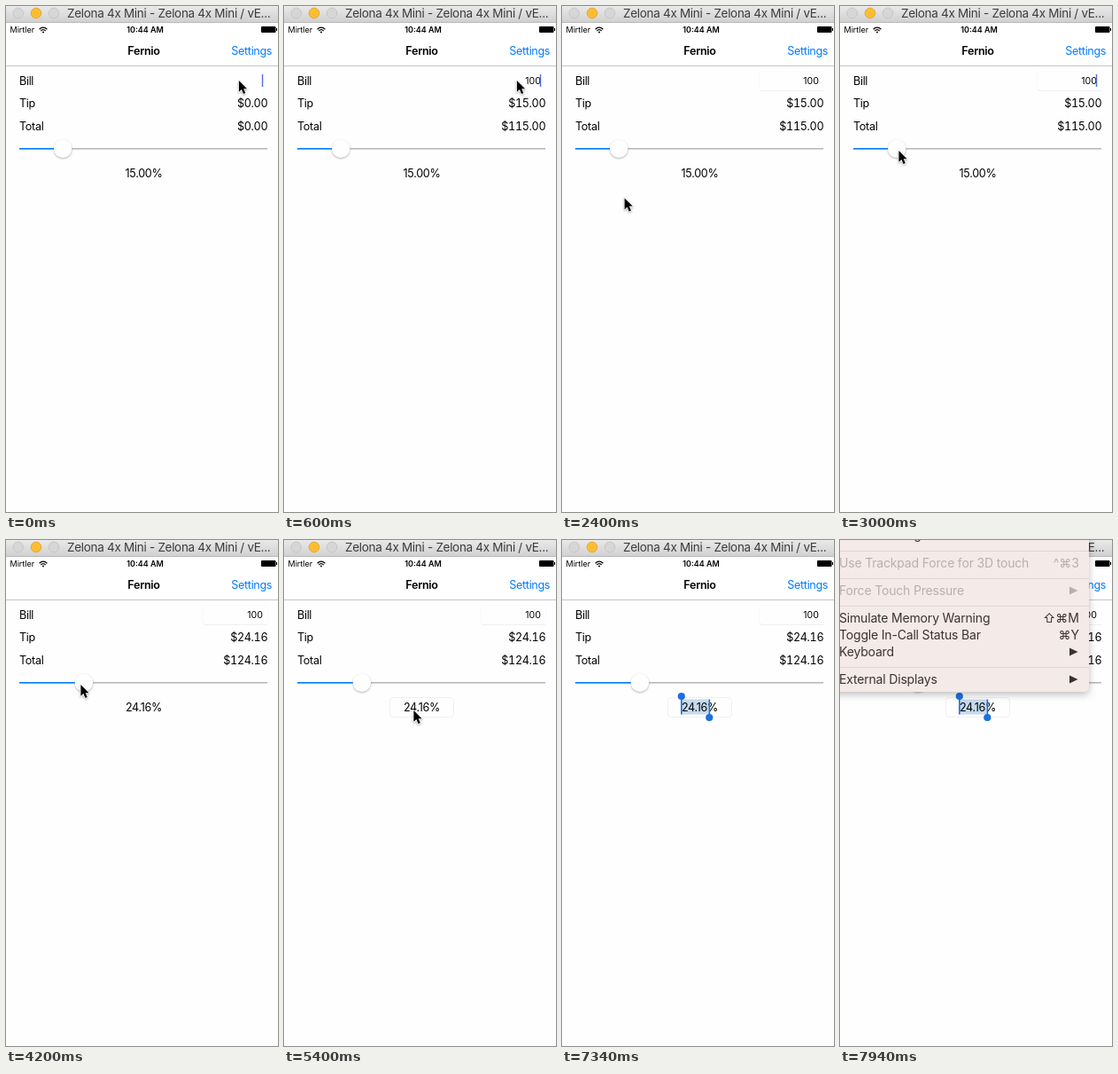
An HTML page that plays this animation: 307 px wide and 570 px high, repeating every 8000 ms.

```html
<!DOCTYPE html>
<html lang="en">
<head>
<meta charset="utf-8">
<title>Tip calculator</title>
<style>
  html, body { margin: 0; width: 100%; height: 100%; overflow: hidden; background: #fefefe; }
  svg { display: block; }
  text {
    font: 12.6px Inter, "Open Sans", "DejaVu Sans", sans-serif;
    letter-spacing: -.33px;
    fill: #000;
    white-space: pre;
  }
  .end { text-anchor: end; }
  .mid { text-anchor: middle; }
  .bold { font-weight: 600; }
  .window { font-size: 13.5px; letter-spacing: -.3px; fill: #3c3c3c; }
  .status { font-size: 9px; letter-spacing: 0; }
  .link { fill: #007aff; }
  .bill { font-size: 10.6px; letter-spacing: 0; }
  .amount { font-variant-numeric: tabular-nums; }
  .caret { fill: #4a6fdc; }
  .field { fill: #fefefe; stroke: #f0f0f0; }
  .faint { stroke: #fafafa; }
  .grip { fill: #1a70e2; }
  #menu text { font-size: 14px; letter-spacing: -.18px; fill: #3b3332; }
  #menu text.off { fill: #b9afad; }
  #menu text.keys { letter-spacing: 0; }
  .shade { filter: drop-shadow(0 1.5px 1.2px rgba(0, 0, 0, .3)); }
  .cast { filter: drop-shadow(0 3px 4px rgba(0, 0, 0, .25)); }
</style>
</head>
<body>
<svg width="307" height="570" viewBox="0 0 307 570">
  <defs>
    <linearGradient id="bar" x2="0" y2="1">
      <stop stop-color="#e9e9e9"/>
      <stop offset="1" stop-color="#d1d1d1"/>
    </linearGradient>
  </defs>

  <!-- window bar -->
  <rect width="307" height="18" fill="url(#bar)"/>
  <rect y="18" width="307" height="1" fill="#b9b9b9"/>
  <g fill="#d6d6d6" stroke="#c2c2c2" stroke-width=".8">
    <circle cx="13.7" cy="8" r="5.8"/>
    <circle cx="34" cy="8" r="5.8" fill="#fdbd30" stroke="#e0a02c"/>
    <circle cx="54" cy="8" r="5.8"/>
  </g>
  <text class="window" x="69" y="13">Zelona 4x Mini - Zelona 4x Mini / vE...</text>

  <!-- status and navigation -->
  <rect y="19" width="307" height="48" fill="#fff"/>
  <rect y="67" width="307" height="1" fill="#c6c6c6"/>
  <text class="status" x="4.5" y="30">Mirtler</text>
  <g fill="none" stroke="#000" stroke-width="1.2">
    <path d="M37.6 26.2Q42 22 46.4 26.2M39.3 28Q42 25.4 44.7 28"/>
    <path d="M41 29.4h2" stroke-width="1.5"/>
  </g>
  <text class="status bold mid" x="157" y="30">10:44 AM</text>
  <rect x="288" y="23" width="16.5" height="7" rx="1" fill="#000"/>
  <rect x="305" y="25" width="1" height="3" fill="#000"/>
  <text class="bold mid" x="155.5" y="55">Fernio</text>
  <text class="link end" x="300.2" y="55">Settings</text>

  <!-- amounts -->
  <g id="billField">
    <rect class="field faint" x="222.5" y="73.5" width="73" height="22" rx="3.5"/>
    <path class="field" d="M223 93.5q.8 2 3 2H295"/>
  </g>
  <text x="15" y="89">Bill</text>
  <text x="15" y="114.3">Tip</text>
  <text x="15" y="139.5">Total</text>
  <text id="bill" class="bill end" x="290" y="88"></text>
  <rect id="caret" class="caret" x="288.8" y="77" width="1.4" height="14"/>
  <text id="tip" class="amount end" x="295.3" y="114.3"></text>
  <text id="total" class="amount end" x="295.3" y="139.5"></text>

  <!-- slider -->
  <rect x="15" y="160" width="280" height="1.5" fill="#b6b6b6"/>
  <rect id="filled" x="15" y="160" height="1.5" fill="#007aff"/>
  <circle id="thumb" class="shade" cy="160.7" r="10.2" fill="#fefefe"/>

  <!-- percentage -->
  <rect id="rateField" class="field" x="119.5" y="177.5" width="72" height="22" rx="4"/>
  <rect id="mark" x="135" y="179.5" width="31" height="17" fill="#c6daee"/>
  <text id="rate" class="mid" x="155.5" y="193"></text>
  <g id="grips" class="grip">
    <rect x="134" y="178" width="1.6" height="18.5"/>
    <circle cx="134.8" cy="176" r="4.1"/>
    <rect x="165.6" y="179.5" width="1.6" height="18.5"/>
    <circle cx="166.3" cy="200" r="4.1"/>
  </g>

  <g id="mouse" class="shade">
    <path d="M.4 1V13.8L3.4 11L5.5 16L7.8 15L5.7 10.2H9.6Z" stroke="#fff" stroke-width="1.6" stroke-linejoin="round" paint-order="stroke"/>
  </g>

  <g id="menu">
    <path class="cast" d="M-9-9H281V166a5 5 0 0 1-5 5H-9Z" fill="#f4eae7"/>
    <path d="M0 12.5H281M0 43.5H281M0 74.5H281M0 143.5H281" stroke="#dfd5d2"/>
  </g>
</svg>
<script>
const LOOP = 8000, STEP = 150, LOW = 15, HIGH = 24.16;
const $ = id => document.getElementById(id);
const show = (id, on) => $(id).setAttribute("visibility", on ? "visible" : "hidden");
const write = (id, value) => { $(id).textContent = value; };
const money = n => "$" + n.toFixed(2);

// pointer: time, x, y
const path = [
  [0, 262.5, 83], [1050, 262.5, 83], [1650, 177, 267.5], [2100, 73, 251],
  [2850, 66, 162], [3150, 66, 162], [3750, 84, 162], [4500, 84, 162],
  [5100, 146, 191], [6300, 146, 191], [6450, 145, 234], [6600, 145, 234],
  [6750, 162, 370], [6900, 182, 488], [7050, 160, 300], [7200, 137, 129]
];
const caretOff = [[1200, 1500], [2100, 2550], [3150, 3600], [4200, LOOP]];

function pointerAt(t) {
  const i = path.findIndex(p => p[0] > t);
  if (i < 0) return path[path.length - 1].slice(1);
  const [t0, x0, y0] = path[i - 1], [t1, x1, y1] = path[i];
  const k = (t - t0) / (t1 - t0);
  return [x0 + (x1 - x0) * k, y0 + (y1 - y0) * k];
}

function addMenu() {
  const rows = [
    [-1, "Non-matching Touch", ""],
    [31, "Use Trackpad Force for 3D touch", "^⌘3", true],
    [62, "Force Touch Pressure", "▶", true],
    [93, "Simulate Memory Warning", "⇧⌘M"],
    [112, "Toggle In-Call Status Bar", "⌘Y"],
    [131, "Keyboard", "▶"],
    [162, "External Displays", "▶"]
  ];
  const add = (tag, attrs, value = "") => {
    const el = document.createElementNS("http://www.w3.org/2000/svg", tag);
    for (const name in attrs) el.setAttribute(name, attrs[name]);
    el.textContent = value;
    $("menu").append(el);
  };
  for (const [y, label, keys, off] of rows) {
    const tone = off ? "off" : "";
    add("text", { x: -1, y, class: tone }, label);
    if (keys === "▶") {
      add("path", { d: `M259 ${y - 9.5}l9.5 4.5l-9.5 4.5z`, fill: off ? "#b9afad" : "#3b3332" });
    } else {
      add("text", { x: 270, y, class: "keys end " + tone }, keys);
    }
  }
}

function draw(now) {
  const time = now % LOOP;
  const t = Math.floor(time / STEP) * STEP;

  const typed = "100".slice(0, Math.max(0, t / STEP - 1));
  const drag = Math.min(1, Math.max(0, (t - 3150) / 600));
  const rate = LOW + (HIGH - LOW) * drag;
  const tip = typed * rate / 100;
  write("bill", typed);
  write("tip", money(tip));
  write("total", money(+typed + tip));
  write("rate", rate.toFixed(2) + "%");

  const x = 25.3 + 2.59 * rate;
  $("thumb").setAttribute("cx", x);
  $("filled").setAttribute("width", x - 15);

  show("billField", t >= 1200);
  show("caret", !caretOff.some(([a, b]) => t >= a && t < b));
  show("rateField", t >= 5400);
  show("mark", t >= 5700);
  show("grips", t >= 5700);

  $("mouse").setAttribute("transform", `translate(${pointerAt(t)})`);
  show("mouse", time < 7340);
  show("menu", time >= 7940);
}

addMenu();
const start = performance.now();
function tick() {
  draw(performance.now() - start);
  requestAnimationFrame(tick);
}
tick();
</script>
</body>
</html>
```
